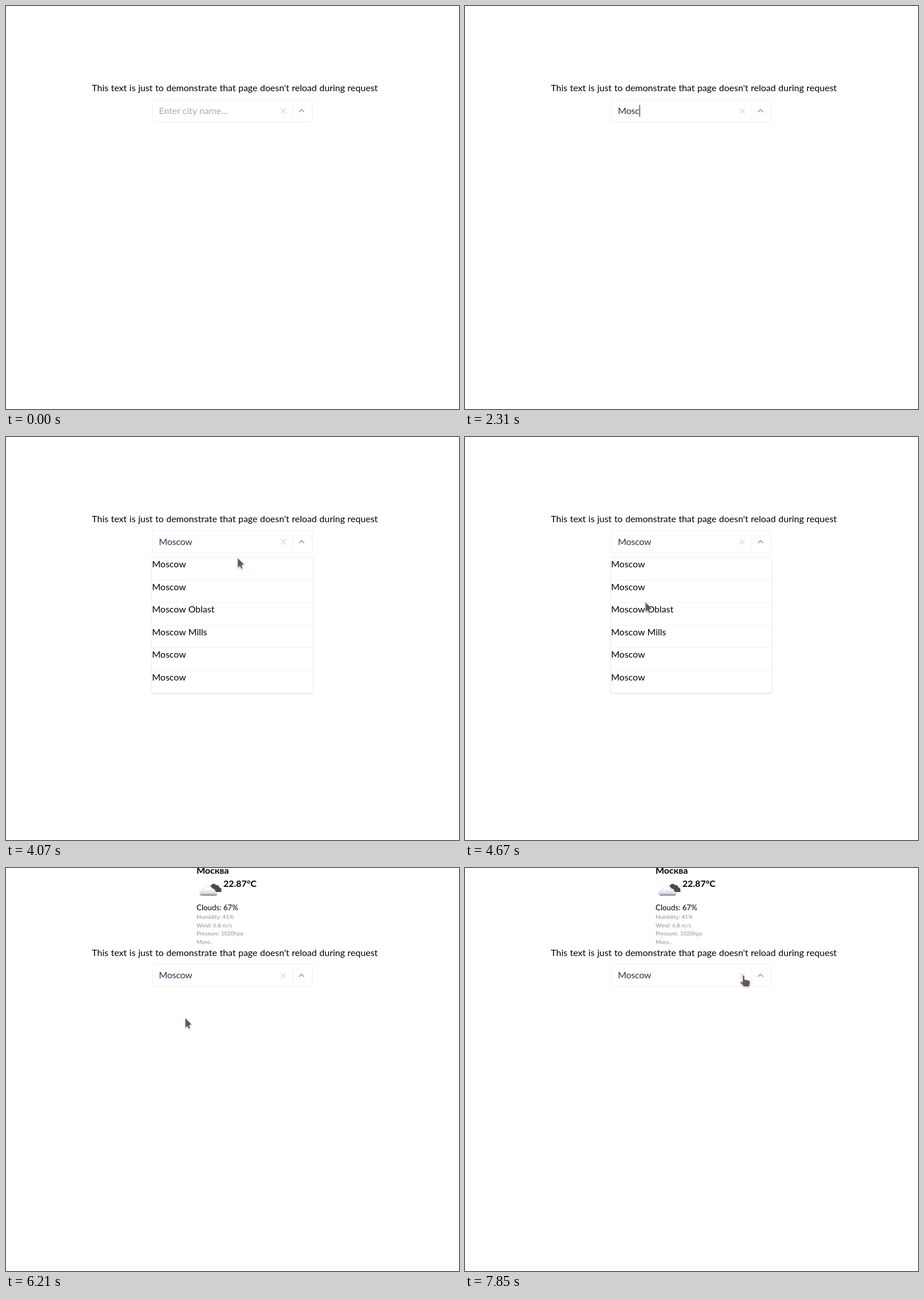
An HTML page for the animation above (8 s loop, 794 px wide and 705 px high).

```html
<!DOCTYPE html>
<html lang="en">
<head>
<meta charset="utf-8">
<title>City weather search</title>
<style>
  html, body { margin: 0; width: 100%; height: 100%; overflow: hidden; background: #fff; }
  svg { display: block; width: 794px; height: 705px; font: 16px Lato, "Open Sans", sans-serif; }
  .head { word-spacing: .45px; }
  .bold { font-weight: 700; }
  .small { font-size: 10px; fill: #8b9299; }
  .word { fill: #243746; letter-spacing: -.2px; }
  .hint { fill: #a3abb3; }
  .rule { fill: none; stroke: #edf0f4; shape-rendering: crispEdges; }
  .panel { fill: #fff; filter: drop-shadow(0 1px 1.5px rgba(0, 0, 0, .17)); }
  .icon { fill: none; stroke-width: 1.4; }
  .mouse { fill: #66555f; stroke: #fff; stroke-width: .8; filter: drop-shadow(.5px 1px 1px rgba(0, 0, 0, .3)); }

  .page, .weather, .hint, .typing, .caret, .found, .exact, .arrow, .beam, .hand
    { animation: 8s step-end infinite; }
  .page { animation-name: page; }
  .weather { animation-name: weather; }
  .hint { animation-name: hint; }
  .typing { animation-name: typing; }
  .caret { animation-name: caret; }
  .found { animation-name: found; }
  .exact { animation-name: exact; }
  .arrow { animation-name: arrow; }
  .beam { animation-name: beam; }
  .hand { animation-name: hand; }
  .pointer { animation: move 8s linear infinite; }
  .ring { fill: none; stroke: #62c4c8; stroke-width: 1; opacity: 0; }
  .focus { animation: focus 8s infinite; }
  .pick { animation: pick 8s infinite; }

  /* 1% = 80 ms */
  @keyframes page { 0% { transform: none } 72%, 100% { transform: translateY(4.7px) } }
  @keyframes weather { 0% { opacity: 0 } 72%, 100% { opacity: 1 } }
  @keyframes hint { 0% { opacity: 1 } 22%, 100% { opacity: 0 } }
  @keyframes typing {
    0% { transform: none }
    22% { transform: translateX(14px) }
    24% { transform: translateX(22.5px) }
    27.5% { transform: translateX(30px) }
    28.875% { transform: translateX(37.5px) }
    32.375% { transform: translateX(47px) }
    36.25%, 100% { transform: translateX(58px) }
  }
  @keyframes caret { 0% { opacity: 0 } 10% { opacity: 1 } 50.875%, 100% { opacity: 0 } }
  @keyframes found { 0% { opacity: 0 } 33.75% { opacity: 1 } 36.875%, 100% { opacity: 0 } }
  @keyframes exact { 0% { opacity: 0 } 36.875% { opacity: 1 } 65.875%, 100% { opacity: 0 } }
  @keyframes arrow { 0% { opacity: 0 } 50.875% { opacity: 1 } 87.9%, 100% { opacity: 0 } }
  @keyframes beam { 0% { opacity: 0 } 87.9% { opacity: 1 } 93.9%, 100% { opacity: 0 } }
  @keyframes hand { 0% { opacity: 0 } 93.9%, 100% { opacity: 1 } }
  @keyframes move {
    0%, 50.875% { transform: translate(406px, 211px) }
    55.5% { transform: translate(345px, 272px) }
    58% { transform: translate(318px, 291px) }
    60.375% { transform: translate(306px, 276px); animation-timing-function: ease-out }
    62.375% { transform: translate(312px, 262px); animation-timing-function: step-end }
    77.625%, 83.5% { transform: translate(314px, 262px); animation-timing-function: ease-in }
    87.5% { transform: translate(356px, 208px) }
    93.25% { transform: translate(465px, 191px) }
    94.2% { transform: translate(486px, 180px); animation-timing-function: ease-out }
    94.875%, 96.75% { transform: translate(496px, 187px) }
    98.125%, 100% { transform: translate(488px, 188px) }
  }
  @keyframes focus {
    0%, 9.87% { r: 1px; opacity: 0 }
    9.875% { r: 2px; opacity: .55; animation-timing-function: cubic-bezier(.2, .7, .4, 1) }
    18.625%, 100% { r: 12px; opacity: 0 }
  }
  @keyframes pick {
    0%, 64.62% { r: 1px; opacity: 0 }
    64.625% { r: 2px; opacity: 1; animation-timing-function: cubic-bezier(.2, .7, .4, 1) }
    69.75% { r: 11.5px; opacity: .2; animation-timing-function: linear }
    73.25%, 100% { r: 12px; opacity: 0 }
  }
</style>
</head>
<body>
<svg viewBox="0 0 794 705">
  <defs>
    <linearGradient id="puff" x2="0" y2="1">
      <stop offset=".25" stop-color="#fff"/>
      <stop offset=".75" stop-color="#dcdce2"/>
      <stop offset="1" stop-color="#6f7590"/>
    </linearGradient>
  </defs>

  <g class="weather">
    <text class="bold" x="334" y="10">Москва</text>
    <path fill="#51464c" d="M356 35a4 4 0 0 1 3-4a5 5 0 0 1 9-1a4.500 4.500 0 0 1 6 4a4 4 0 0 1 3.500 4v4h-15z"/>
    <path fill="url(#puff)" stroke="#c9cad2" stroke-width=".5" d="M344 48.500a4.500 4.500 0 0 1-.5-9a5 5 0 0 1 5-4a7 7 0 0 1 13 .5a5.500 5.500 0 0 1 5.500 5a4 4 0 0 1 1 7.500z"/>
    <text class="bold" x="381" y="33">22.87°C</text>
    <text x="334" y="73.500" font-size="13.300">Clouds: 67%</text>
    <text class="small">
      <tspan x="334" y="89">Humidity: 41%</tspan>
      <tspan x="334" y="103.500">Wind: 6.8 m/s</tspan>
      <tspan x="334" y="118">Pressure: 1020hpa</tspan>
      <tspan x="334" y="132.500">More..</tspan>
    </text>
  </g>

  <g class="page">
    <text class="head" x="150.500" y="149">This text is just to demonstrate that page doesn't reload during request</text>
    <rect x="256.500" y="163.500" width="280.500" height="39.500" rx="2.500" fill="#fff" stroke="#ebeff4"/>
    <text class="word" x="268" y="188.500">Moscow</text>
    <g class="typing">
      <rect x="268" y="170" width="66" height="27" fill="#fff"/>
      <rect class="caret" x="268" y="173" width="1.200" height="21" fill="#1d2b45"/>
    </g>
    <text class="hint" x="268" y="188.500">Enter city name...</text>
    <path class="rule" d="M502.500 167v32"/>
    <path class="icon" stroke="#d3dae3" d="M481.500 179l9 9m0-9l-9 9"/>
    <path class="icon" stroke="#7390a3" stroke-width="1.600" d="M513.500 185.500l4.500-4.500 4.500 4.500"/>
  </g>

  <g class="found">
    <rect class="panel" x="255.500" y="210.500" width="282" height="290" rx="2"/>
    <path class="rule" d="M256 210.500h281M256 250.500h270M256 289.500h270M256 329.500h270M256 368.500h270M256 408.500h270M256 447.500h270M256 487.500h270"/>
    <rect x="526" y="211" width="11.500" height="290" fill="#cbcbd0"/>
    <rect x="528.500" y="214" width="6" height="36.500" rx="1" fill="#5f8fae"/>
    <svg x="255" y="210" width="271" height="290.500" viewBox="255 210 271 290.500">
      <text y="188.500">
        <tspan x="256" dy="39.500">Moscow</tspan>
        <tspan x="256" dy="39.500">Moscow</tspan>
        <tspan x="256" dy="39.500">Moscow Oblast</tspan>
        <tspan x="256" dy="39.500">Zamość</tspan>
        <tspan x="256" dy="39.500">Zamość</tspan>
        <tspan x="256" dy="39.500">Stary Zamość</tspan>
        <tspan x="256" dy="39.500">Porto Moscal</tspan>
        <tspan x="256" dy="39.500">Moscavide e Portela</tspan>
      </text>
    </svg>
  </g>

  <g class="exact">
    <rect class="panel" x="255.500" y="210.500" width="282" height="237" rx="2"/>
    <path class="rule" d="M256 210.500h281M256 250.500h281M256 289.500h281M256 329.500h281M256 368.500h281M256 408.500h281"/>
    <text y="188.500">
      <tspan x="256" dy="39.500">Moscow</tspan>
      <tspan x="256" dy="39.500">Moscow</tspan>
      <tspan x="256" dy="39.500">Moscow Oblast</tspan>
      <tspan x="256" dy="39.500">Moscow Mills</tspan>
      <tspan x="256" dy="39.500">Moscow</tspan>
      <tspan x="256" dy="39.500">Moscow</tspan>
    </text>
  </g>

  <circle class="ring focus" cx="356" cy="183.500" r="1"/>
  <circle class="ring pick" cx="313" cy="262" r="1"/>

  <g class="pointer">
    <path class="arrow mouse" d="M0 0V17.500L4 15 6.800 19.800 9 18.600 7.300 13.300 11.500 11.500Z"/>
    <path class="beam" fill="none" stroke="#66555f" d="M-3 -8.500h2.500l.5 .5 .5-.5H3M0-8V8M-3 8.500h2.500l.5-.5 .5 .5H3"/>
    <path class="hand mouse" d="M-1.500 1.500a1.700 1.700 0 0 1 3.400 0V7l7 1.300q2.600 .6 2.600 3v3l-1.500 5.200H1L-4.800 13q-1.500-2.200 .6-2.600l2.700 1.300Z"/>
  </g>
</svg>
</body>
</html>
```
